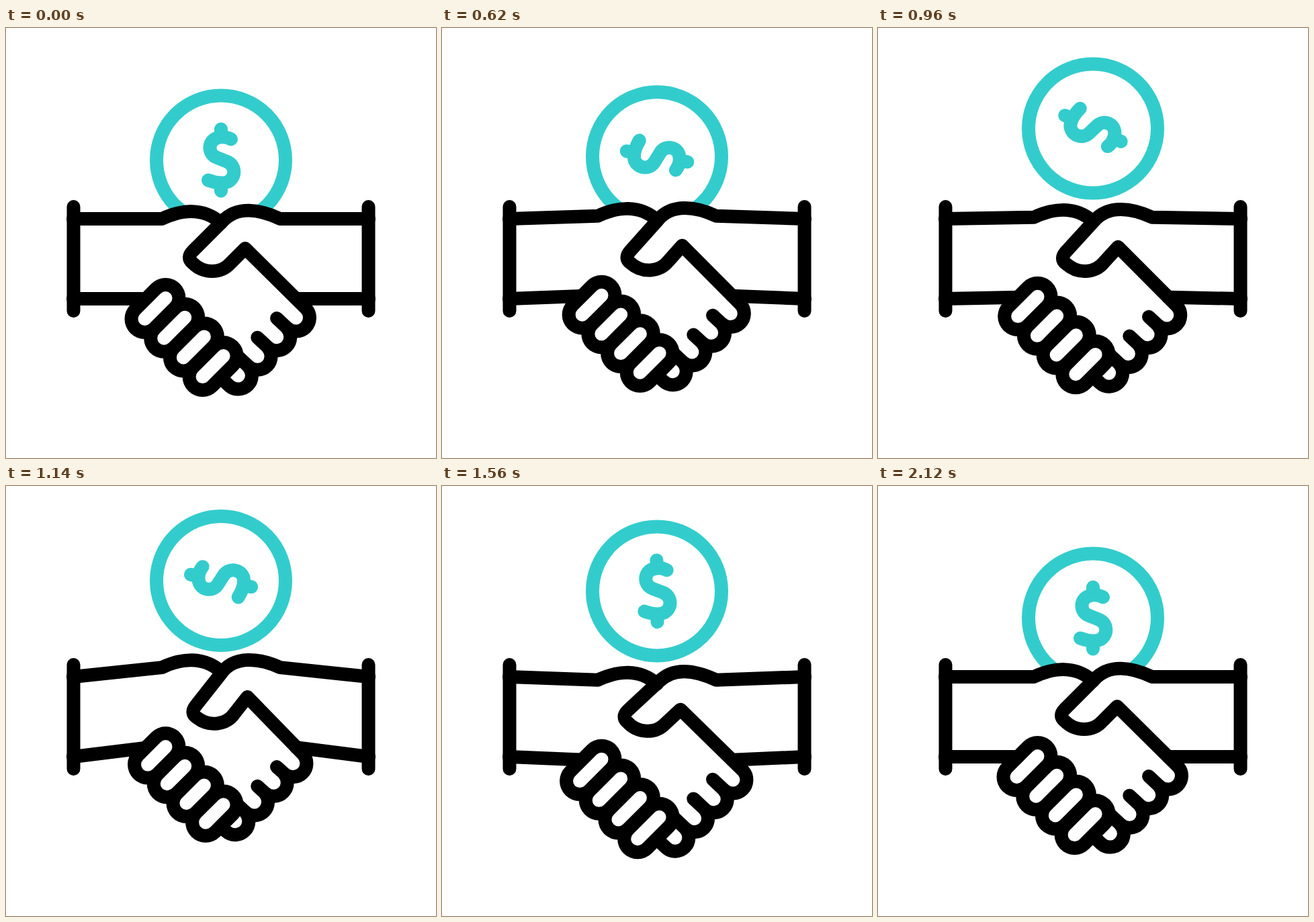
An HTML page for the animation above (2.34 s loop, 640 px wide and 640 px high).

```html
<!DOCTYPE html>
<html lang="en">
<head>
<meta charset="utf-8">
<title>Handshake and coin</title>
<style>
html, body { margin: 0; height: 100%; overflow: hidden; background: #fff; }
svg { display: block; width: 100vw; height: 100vh; }
path, circle { fill: none; stroke: #000; stroke-width: 20; stroke-linecap: round; stroke-linejoin: round; }
#coin * { stroke: #3cc; }
#back { fill: #fff; stroke: none; }
#knuckles { stroke-width: 60; }
#gaps { stroke: #fff; }
</style>
</head>
<body>
<svg viewBox="0 0 640 640">
  <g id="coin">
    <circle r="96"/>
    <path id="dollar" d="M15-31Q4-37-8-32C-20-26-19-9-7-4L8 2C22 7 23 25 11 32Q0 37-19 30M0-46V-36M0 36V46"/>
  </g>
  <g id="hands">
    <path id="back"/>
    <path id="arms"/>
    <path id="right"/>
    <path id="knuckles"/>
    <path id="gaps"/>
  </g>
  <path d="M100.5 266V421M539.5 266V421"/>
</svg>
<script>
const LOOP = 2340, LANDING = 1780, STEP = 28.7;
const $ = id => document.getElementById(id);

// Tracks are [time, value] pairs.
const lift = [[200, 0], [450, -14.3], [820, 8.5], [1115, -14.4], [1410, 8.8], [1960, -13.5], [2120, 0]];
const grip = [[200, 0], [450, 1], [820, -.2], [1115, 1.02], [1410, -.6], [1960, .95], [2120, 0]];
const toss = [[200, 0], [445, 18], [780, -32.5], [1140, -55.5], [1290, -58], [1380, -56.5], [LANDING, -8], [1900, 10]];
const spin = [[450, 0], [780, 263], [1140, 641], [1380, 705], [1600, 720]];

// Monotone cubic interpolation, at rest on every turning point.
function track(keys, t) {
  const last = keys.length - 1;
  if (t <= keys[0][0]) return keys[0][1];
  if (t >= keys[last][0]) return keys[last][1];
  const secant = i => (keys[i + 1][1] - keys[i][1]) / (keys[i + 1][0] - keys[i][0]);
  const slope = i => {
    if (i === 0 || i === last) return 0;
    const a = secant(i - 1), b = secant(i);
    return a * b > 0 ? 2 * a * b / (a + b) : 0;
  };
  const i = keys.findIndex(k => k[0] > t) - 1;
  const [t0, v0] = keys[i], [t1, v1] = keys[i + 1];
  const span = t1 - t0, u = (t - t0) / span, w = 1 - u;
  return v0 * w * w * (1 + 2 * u) + v1 * u * u * (1 + 2 * w)
    + span * u * w * (slope(i) * w - slope(i + 1) * u);
}

function drawHands(y, squeeze) {
  const s = 4.6 * squeeze, angle = -.12 * squeeze;
  const cos = Math.cos(angle), sin = Math.sin(angle);
  const thumb = (px, py) => {
    const dx = px - 356, dy = py - 300;
    return `${356 + dx * cos - dy * sin} ${300 + dx * sin + dy * cos} `;
  };
  const top = 284 - y, bottom = 403 - y;
  const leftTop = `M100 ${top}L232 284C262 270 294 267 320 290`;

  let right = `M540 ${top}L408 284C378 270 ${thumb(344, 264)}${thumb(322, 288)}`
    + `L${thumb(278, 332)}Q${thumb(268, 342)}${thumb(278, 350)}`
    + `C${thumb(294, 366)}${thumb(320, 366)}${thumb(334, 350)}L${thumb(356, 328)}`;
  let fingers = '';
  for (let i = 0; i < 4; i++) {
    const d = i * STEP;
    right += `${i ? 'M' : 'L'}${447 - d - s} ${418 + d - s}a20.2 20.2 0 0 1 -28.5 28.5L${403 - d} ${432 + d}`;
    fingers += `M${237.5 + d} ${402 + d}L${206.5 + d + s} ${433 + d - s}`;
  }

  $('hands').setAttribute('transform', `translate(0 ${y})`);
  $('back').setAttribute('d', `${leftTop}C344 264 378 270 408 284L540 ${top}V${bottom}H100Z`);
  $('arms').setAttribute('d', `${leftTop}M100 ${bottom}L213 403M540 ${bottom}L432 403`);
  $('right').setAttribute('d', right);
  $('knuckles').setAttribute('d', fingers);
  $('gaps').setAttribute('d', fingers);
}

function frame() {
  const t = performance.now() % LOOP;
  const y = track(lift, t);
  const coinY = t < LANDING ? track(toss, t) : y;
  drawHands(y, track(grip, t));
  $('coin').setAttribute('transform', `translate(320 ${196.5 + coinY})`);
  $('dollar').setAttribute('transform', `rotate(${track(spin, t)})`);
  requestAnimationFrame(frame);
}
frame();
</script>
</body>
</html>
```
